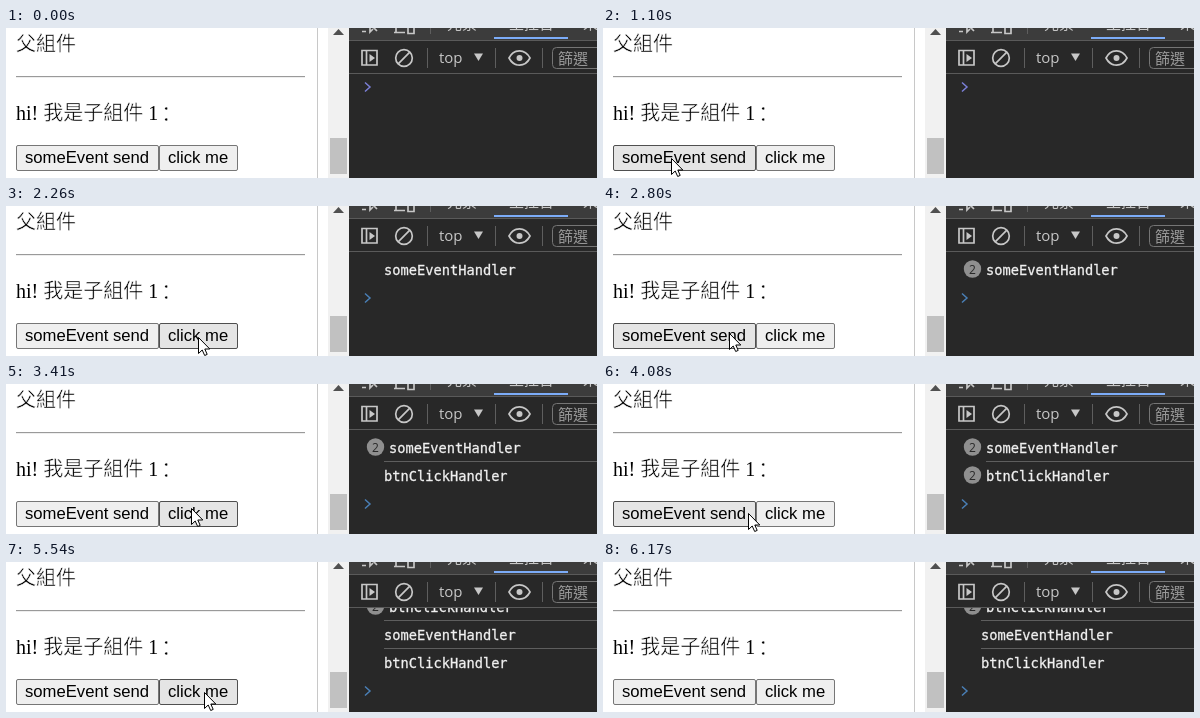
Write an HTML page that moves like this. It is 591 by 150 pixels and loops after 7360 ms.

```html
<!DOCTYPE html>
<html lang="zh-Hant">
<head>
<meta charset="utf-8">
<style>
  html, body { margin: 0; width: 100%; height: 100%; overflow: hidden; background: #fff; }
  svg { display: block; }
  .page { font: 20px "Liberation Serif", "Noto Sans CJK TC", "Noto Sans CJK", serif; }
  /* A thin white outline slims the strokes of the heavier CJK face. */
  .cjk { font-family: "Noto Sans CJK TC", "Noto Sans CJK", sans-serif; font-weight: 300; stroke: #fff; stroke-width: .5px; }
  .button rect { fill: #efefef; stroke: #767676; }
  .button.hover rect { fill: #e5e5e5; stroke: #4f4f4f; }
  .button.active rect { fill: #f5f5f5; stroke: #8d8d8d; }
  .button text { font: 16.667px "Liberation Sans", sans-serif; }
  .tool { font: 15px "Open Sans", "Noto Sans CJK TC", "Noto Sans CJK", sans-serif; fill: #c7c7c7; }
  .icon { fill: none; stroke: #c7c7c7; stroke-width: 1.7; }
  .log { font: 13.7px "DejaVu Sans Mono", monospace; fill: #f0f0f0; stroke: #f0f0f0; stroke-width: .3px; }
  .badge { font: 12px "Open Sans", sans-serif; fill: #282828; text-anchor: middle; }
</style>
</head>
<body>
<svg width="591" height="150" viewBox="0 0 591 150">
  <defs><clipPath id="consoleArea"><rect x="343" y="46" width="248" height="104"/></clipPath></defs>

  <g class="page">
    <text class="cjk" x="10" y="23">父組件</text>
    <path d="M10 48.5H299" stroke="#9a9a9a"/>
    <path d="M10 49.5H299" stroke="#eee"/>
    <text x="10" y="92">hi! <tspan class="cjk">我是子組件</tspan> 1<tspan class="cjk" dx="-2" dy="2">：</tspan></text>
  </g>
  <g class="button" id="send">
    <rect x="10.5" y="117.5" width="142" height="25" rx="1.5"/>
    <text x="19" y="135">someEvent send</text>
  </g>
  <g class="button" id="click">
    <rect x="153.5" y="117.5" width="78" height="25" rx="1.5"/>
    <text x="162" y="135">click me</text>
  </g>

  <path d="M311.5 0V150" stroke="#c8c8c8"/>
  <rect x="322" width="21" height="150" fill="#f1f1f1"/>
  <path d="M327 7L332.5 1L338 7Z" fill="#505050"/>
  <rect x="324" y="110" width="17" height="36" fill="#c1c1c1"/>

  <rect x="343" width="248" height="150" fill="#282828"/>
  <rect x="343" width="248" height="12" fill="#3c3c3c"/>
  <path d="M343 12.5H591M343 45.5H591" stroke="#5a5a5a"/>
  <rect x="488" y="9" width="74" height="2" fill="#7cacf8"/>
  <g class="tool">
    <text x="441" y="1">元素</text>
    <text x="503" y="1">主控台</text>
    <text x="577" y="1">來源</text>
    <text x="433" y="35">top</text>
    <path d="M468 25.5H477L472.5 33Z"/>
    <path d="M363.5 26L369 30L363.5 34Z"/>
    <circle cx="513.5" cy="30" r="3"/>
  </g>
  <g class="icon">
    <path d="M356 3.5H360M366 -2L371 3M364 -2V4L367 1"/>
    <path d="M388 4.5H399M390 0V4M402 -1H408V5.5H402Z"/>
    <path d="M356 22.5H371V37H356ZM360.5 22.5V37"/>
    <circle cx="398" cy="30" r="8.3"/>
    <path d="M392.2 35.8L403.8 24.2"/>
    <path d="M503 30C508 20.5 519 20.5 524 30C519 39.5 508 39.5 503 30Z"/>
  </g>
  <path d="M424.5 0V6M421.5 20V40M489.5 20V40M536.5 20V40" stroke="#5e5e5e"/>
  <rect x="546.5" y="19.5" width="60" height="21" rx="4" fill="#282828" stroke="#757575"/>
  <text class="tool" x="552" y="35.5" style="fill:#999;font-weight:300">篩選</text>

  <g clip-path="url(#consoleArea)">
    <g id="logs"></g>
    <path id="prompt" d="M359 -4.5L364 0L359 4.5" fill="none" stroke-width="1.5"/>
  </g>
  <path id="cursor" d="M.5 .5V16.5L4.2 13L6.7 18.5L9.2 17.4L6.8 12H11.8Z" fill="#fff" stroke="#000"/>
</svg>
<script>
const LOOP = 7360, PRESS = 70, ROW = 28, FIRST_ROW = 64, LAST_ROW = 101;
const byId = id => document.getElementById(id);
const cursor = byId("cursor"), logs = byId("logs"), prompt = byId("prompt");

const buttons = [
  { node: byId("send"), left: 10, right: 153, message: "someEventHandler" },
  { node: byId("click"), left: 153, right: 232, message: "btnClickHandler" }
];
const buttonAt = ({ x, y }) =>
  buttons.find(b => x >= b.left && x < b.right && y >= 117 && y < 143);

// Places where the pointer rests, with the times of its mouse presses.
const stop = (arrive, leave, x, y, ...presses) => ({ arrive, leave, x, y, presses });
const stops = [
  stop(330, 330, 383, 146),
  stop(1030, 1760, 68, 130, 1430),
  stop(2260, 2390, 192, 131),
  stop(2530, 2800, 126, 127, 2600),
  stop(3210, 3940, 185, 124, 3340, 3870),
  stop(4080, 4630, 145, 129, 4360),
  stop(4840, 4840, 167, 124),
  stop(5080, 5080, 274, 131),
  stop(5330, 5500, 195, 131, 5400),
  stop(6170, 6170, 493, 148)
];
const clicks = stops.flatMap(s =>
  s.presses.map(press => ({ press, release: press + PRESS, button: buttonAt(s) })));

// Between stops the pointer eases along a shallow upward arc.
function pointerAt(t) {
  const i = stops.findIndex(s => t < s.arrive);
  if (i < 1) return null;
  const from = stops[i - 1], to = stops[i];
  const k = Math.max(0, (t - from.leave) / (to.arrive - from.leave));
  const eased = k * k * (3 - 2 * k);
  const dx = to.x - from.x;
  const lift = Math.abs(dx) * 0.12 * Math.sin(Math.PI * eased);
  return {
    x: Math.round(from.x + dx * eased),
    y: Math.round(from.y + (to.y - from.y) * eased - lift)
  };
}

// Equal consecutive messages share one row with a counter.
function rowsAt(t) {
  const rows = [];
  for (const { release, button: { message } } of clicks) {
    if (t < release) break;
    const last = rows[rows.length - 1];
    if (last && last.message === message) last.count++;
    else rows.push({ message, count: 1 });
  }
  return rows;
}

function rowMarkup({ message, count }, i, scroll) {
  const y = FIRST_ROW + i * ROW - scroll, x = count > 1 ? 383 : 378;
  const line = i ? `<path d="M${x} ${y - 14.5}H591" stroke="#5e5e5e"/>` : "";
  const badge = count > 1
    ? `<circle cx="369.5" cy="${y - 1}" r="8.7" fill="#8f8f8f"/>
       <text class="badge" x="369.5" y="${y + 3.5}">${count}</text>` : "";
  return `${line}${badge}<text class="log" x="${x}" y="${y + 5}">${message}</text>`;
}

let shownLogs = null;
function render(t) {
  const pointer = pointerAt(t);
  cursor.style.display = pointer ? "" : "none";
  if (pointer) cursor.setAttribute("transform", `translate(${pointer.x} ${pointer.y})`);

  const hovered = pointer && buttonAt(pointer);
  const pressed = clicks.some(c => t >= c.press && t < c.release);
  for (const button of buttons) {
    const state = button !== hovered ? "" : pressed ? "active" : "hover";
    button.node.setAttribute("class", `button ${state}`);
  }

  const rows = rowsAt(t);
  const scroll = Math.max(0, FIRST_ROW + (rows.length - 1) * ROW - LAST_ROW);
  const markup = rows.map((row, i) => rowMarkup(row, i, scroll)).join("");
  if (markup !== shownLogs) logs.innerHTML = shownLogs = markup;
  const promptY = rows.length ? FIRST_ROW + rows.length * ROW - scroll : 59;
  prompt.setAttribute("transform", `translate(0 ${promptY})`);
  prompt.setAttribute("stroke", rows.length ? "#4a7fb5" : "#7b7fd6");
}

const start = performance.now();
function tick() {
  render((performance.now() - start) % LOOP);
  requestAnimationFrame(tick);
}
tick();
</script>
</body>
</html>
```
